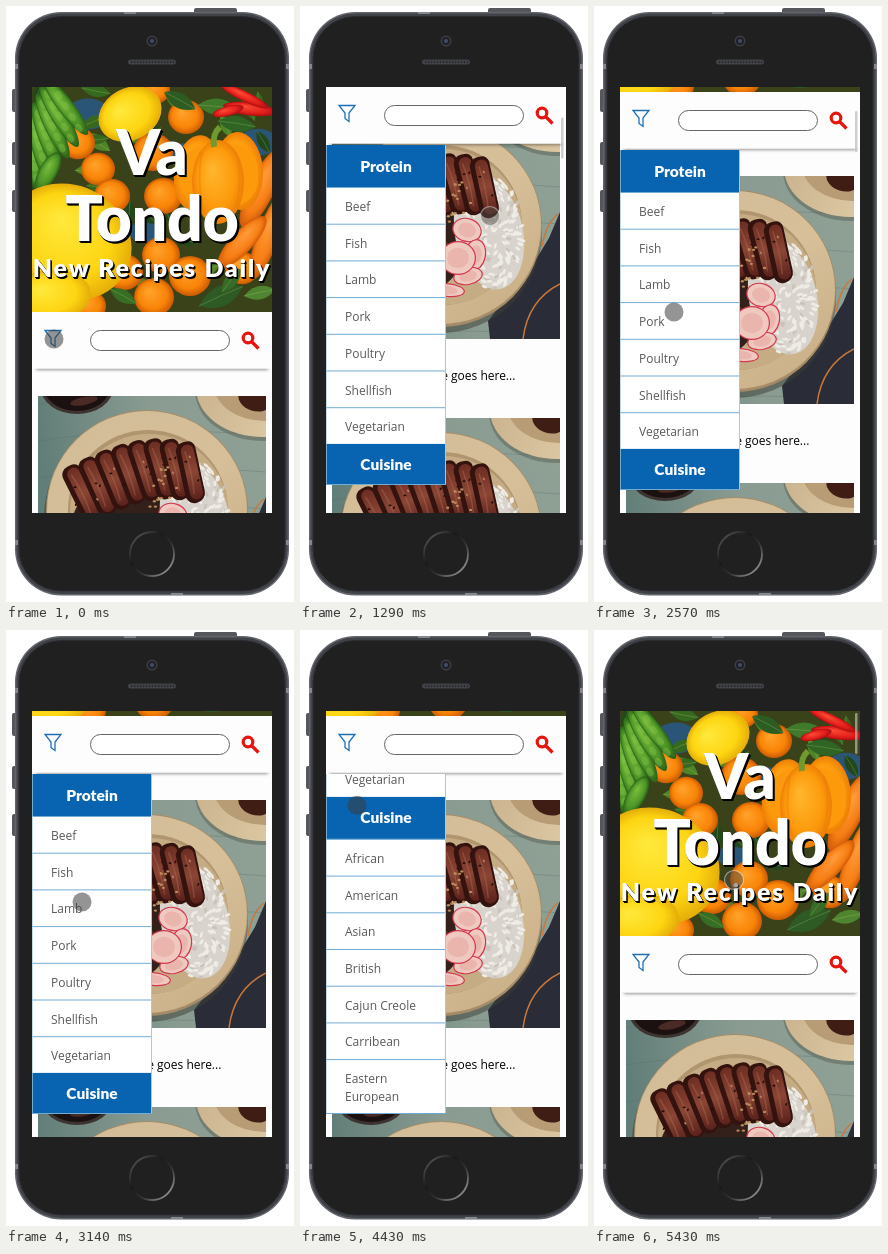
Write an HTML page with a canvas that moves like this. It is 288 px wide and 596 px high and loops after 5570 ms.

```html
<!DOCTYPE html>
<html lang="en">
<head>
<meta charset="utf-8">
<title>Recipe app demo</title>
<style>
html, body { margin: 0; width: 100%; height: 100%; overflow: hidden; background: #fff; }
canvas { display: block; width: 288px; height: 596px; }
</style>
</head>
<body>
<canvas id="stage"></canvas>
<script>
const W = 288, H = 596, LOOP = 5570, STEP = 1000 / 7, FRAMES = 39;
const SCREEN = { x: 26, y: 81, w: 240, h: 426 };
const HEAD = 'Lato, "Open Sans", sans-serif', BODY = '"Open Sans", "Noto Sans", sans-serif';
const BLUE = '#0864b1';

const canvas = document.getElementById('stage');
const dpr = Math.max(1, window.devicePixelRatio || 1);
canvas.width = W * dpr;
canvas.height = H * dpr;
const c = canvas.getContext('2d');

const rand = i => { const v = Math.sin(i * 12.9898) * 43758.5453; return v - Math.floor(v); };

// Each key is [step, value, value, ...]; values between keys are linear.
function track(keys, k) {
  let i = 0;
  while (i < keys.length - 2 && k >= keys[i + 1][0]) i++;
  const a = keys[i], b = keys[i + 1];
  const p = Math.min(1, Math.max(0, (k - a[0]) / (b[0] - a[0])));
  return a.slice(1).map((v, n) => v + (b[n + 1] - v) * p);
}

const pointer = [
  [0, 48, 333], [1, 48, 333], [3, 140, 440], [4, 190, 488], [6, 196, 398],
  [8, 194, 253], [9, 190, 210], [12, 95, 165], [14, 88, 198], [18, 80, 306],
  [20, 78, 304], [22, 76, 272], [24, 77, 430], [26, 77, 310], [27, 77, 304],
  [29, 77, 300], [32, 47, 113], [33, 47, 113], [35, 97, 160], [36, 112, 178], [38, 140, 250]
];
const pageKeys = [[0, 0], [4, 0], [6, 90], [8, 235], [9, 285], [11, 328], [14, 328], [18, 220], [35, 220], [36, 180], [37, 80], [38, 0]];
const menuKeys = [[0, 0], [23, 0], [24, 30], [26, 230], [27, 276], [38, 276]];

function rect(x, y, w, h, color) {
  c.fillStyle = color;
  c.fillRect(x, y, w, h);
}

function round(x, y, w, h, r, fill, stroke, line = 1) {
  c.beginPath();
  c.roundRect(x, y, w, h, r);
  if (fill) { c.fillStyle = fill; c.fill(); }
  if (stroke) { c.strokeStyle = stroke; c.lineWidth = line; c.stroke(); }
}

function oval(x, y, rx, ry, fill, turn = 0) {
  c.beginPath();
  c.ellipse(x, y, rx, ry, turn, 0, 7);
  c.fillStyle = fill;
  c.fill();
}

function shape(points, fill, stroke, line = 1) {
  c.beginPath();
  points.forEach(([x, y]) => c.lineTo(x, y));
  c.closePath();
  if (fill) { c.fillStyle = fill; c.fill(); }
  if (stroke) { c.strokeStyle = stroke; c.lineWidth = line; c.stroke(); }
}

function curve(x0, y0, cx, cy, x1, y1, color, line) {
  c.beginPath();
  c.moveTo(x0, y0);
  c.quadraticCurveTo(cx, cy, x1, y1);
  c.strokeStyle = color;
  c.lineWidth = line;
  c.stroke();
}

function blend(x0, y0, x1, y1, ...colors) {
  const g = c.createLinearGradient(x0, y0, x1, y1);
  colors.forEach((color, i) => g.addColorStop(i / (colors.length - 1), color));
  return g;
}

function write(str, x, y, font, color, align = 'left') {
  c.font = font;
  c.fillStyle = color;
  c.textAlign = align;
  c.fillText(str, x, y);
}

function clipped(x, y, w, h, draw) {
  c.save();
  c.beginPath();
  c.rect(x, y, w, h);
  c.clip();
  draw();
  c.restore();
}

// Shaded fruit: light upper left, darker rim.
function fruit(x, y, rx, ry, [light, mid, dark], turn = 0) {
  c.save();
  c.translate(x, y);
  c.rotate(turn);
  c.scale(rx, ry);
  const g = c.createRadialGradient(-.25, -.3, .05, 0, 0, 1);
  g.addColorStop(0, light);
  g.addColorStop(.7, mid);
  g.addColorStop(1, dark);
  oval(0, 0, 1, 1, g);
  c.restore();
}

function leaf(x, y, len, turn, color) {
  c.save();
  c.translate(x, y);
  c.rotate(turn);
  c.beginPath();
  c.moveTo(0, 0);
  c.quadraticCurveTo(len * .5, -len * .42, len, 0);
  c.quadraticCurveTo(len * .5, len * .42, 0, 0);
  c.fillStyle = color;
  c.fill();
  c.globalAlpha = .3;
  curve(0, 0, len / 2, -1, len, 0, '#b7d46a', .8);
  c.restore();
}

const ORANGE = ['#ffa22a', '#f98407', '#c95a04'];
const PEPPER = ['#ffb52c', '#fd9a0c', '#ee7f06'];
const LEMON = ['#ffe83a', '#fdd512', '#e5ad08'];
const CARROT = ['#ff9a38', '#f67d14', '#cf5a08'];
const GREEN = ['#79bb3c', '#4c9426', '#2a6018'];
const RED = ['#fb4a34', '#e01d1a', '#a80e10'];

function hero() {
  rect(26, 81, 240, 225, '#3a4219');
  [[82, 108, 22], [176, 148, 15], [252, 136, 19], [138, 226, 15]].forEach(([x, y, r]) => oval(x, y, r, r * .7, '#2b5577'));
  for (let i = 0; i < 34; i++)
    leaf(30 + rand(i + 3) * 225, 84 + rand(i + 41) * 215, 18 + rand(i + 9) * 16, rand(i + 70) * 6.3, ['#21471b', '#35691f', '#4f8428'][i % 3]);
  [[150, 84, 14], [180, 111, 18], [72, 137, 17], [92, 163, 17], [147, 146, 20], [106, 190, 18], [157, 190, 19],
   [118, 266, 19], [155, 249, 19], [184, 270, 21], [148, 291, 20], [236, 262, 17], [84, 300, 16]]
    .forEach(([x, y, r]) => fruit(x, y, r, r * .95, ORANGE));

  // Pods in the corner, each with a row of bumps.
  for (let i = 0; i < 6; i++) {
    const x = 27 + i * 6.5, y = 150 - i * 10, turn = -.15 - i * .1;
    fruit(x, y, 8, 36, GREEN, turn);
    for (let j = -2; j <= 2; j++)
      oval(x - Math.sin(turn) * j * 11, y + j * 11, 3.2, 4.6, '#86c44966', turn);
  }
  fruit(42, 166, 9, 22, GREEN, .5);

  fruit(124, 108, 33, 26, LEMON, -.5);
  leaf(158, 86, 36, .5, '#2d5c22');
  leaf(192, 99, 40, .1, '#3f7a2b');
  fruit(244, 103, 27, 6.5, RED, .12);
  fruit(238, 90, 27, 5, RED, .45);
  fruit(222, 105, 16, 5, RED, -.25);
  leaf(212, 115, 38, .15, '#2f6424');

  fruit(256, 182, 13, 44, CARROT, .45);
  fruit(262, 230, 11, 46, CARROT, .35);
  fruit(236, 236, 11, 34, CARROT, .75);
  fruit(191, 167, 23, 38, PEPPER, .13);
  fruit(233, 165, 24, 39, PEPPER, -.06);
  round(176, 138, 76, 62, 26, '#fd9a0c');
  fruit(212, 176, 26, 42, PEPPER);
  curve(196, 146, 190, 176, 198, 206, '#ea800770', 2);
  curve(230, 146, 238, 176, 228, 206, '#ea800770', 2);
  curve(208, 141, 206, 128, 214, 121, '#6f9a2e', 6);

  fruit(62, 236, 65, 57, LEMON, .45);
  fruit(45, 290, 40, 26, LEMON, -.1);
  leaf(193, 300, 48, -.42, '#2d5a25');
  leaf(238, 290, 32, -.2, '#4f8530');
  leaf(216, 286, 30, -.9, '#386b27');
  leaf(104, 283, 30, .5, '#376d25');

  const title = (str, x, y, size, off, gap) => {
    c.letterSpacing = gap + 'px';
    const font = `900 ${size}px ${HEAD}`;
    for (let d = off; d > 0; d -= .5) write(str, x + d, y + d, font, '#000', 'center');
    write(str, x, y, font, '#fff', 'center');
    c.letterSpacing = '0px';
  };
  title('Va', 146, 169, 62, 2, 0);
  title('Tondo', 146, 235, 62, 2, 0);
  title('New Recipes Daily', 146, 271, 25, 1.5, 1.7);
}

function radish(x, y, rx, ry, turn) {
  oval(x, y, rx, ry, '#d0364c', turn);
  oval(x, y, rx - 1.2, ry - 1.2, '#efc9c0', turn);
  oval(x, y, rx * .6, ry * .6, '#e3a39b88', turn);
}

// One recipe picture, 228 square.
function dish() {
  rect(0, 0, 228, 228, blend(0, 30, 228, 0, '#627e78', '#8a9c92', '#8fa095'));
  for (let i = 0; i < 7; i++) curve(0, i * 37 + 8, 100, i * 37 - 8, 228, i * 37 + 2, '#4f6a654d', 1);

  oval(39, -8, 36, 26, '#3d3330');
  oval(39, -9, 33, 24, '#1a1110');
  oval(46, 5, 14, 4, '#4a2a24', -.2);
  oval(225, -5, 68, 50, '#5a605280');
  oval(225, -8, 67, 49, blend(160, 0, 228, 40, '#cbb48f', '#dcc7a3'));
  oval(227, -11, 51, 36, '#b79c76');
  oval(217, 3, 17, 12, '#3f1d15', .3);

  shape([[228, 101], [217, 127], [203, 150], [156, 210], [158, 228], [228, 228]], '#2a2c38');
  curve(226, 103, 214, 112, 210, 136, '#c9783a', 1.5);
  curve(228, 173, 196, 189, 191, 228, '#c9783a', 1.5);
  curve(2, 162, 14, 187, 22, 228, '#a9b2af', 4);
  for (let i = 0; i < 4; i++) curve(1 + i * 5, 154 - i, 2 + i * 5, 171, 9 + i * 2, 183, '#b4bcba', 1.6);

  oval(108, 121, 102, 101, '#3c3f3680');
  oval(109, 115, 101, 101, '#a58b67');
  oval(109, 114, 100, 99, blend(40, 30, 180, 210, '#d3bd98', '#d6bf99', '#c9af87'));
  oval(110, 114, 80, 80, '#b0956f');
  oval(111, 116, 79, 78, '#c6ac85');

  oval(83, 134, 50, 48, '#33201a', .4);
  oval(157, 122, 34, 57, '#d8d4cd', -.2);
  for (let i = 0; i < 230; i++) {
    const a = rand(i + 5) * 6.3, r = Math.sqrt(rand(i + 300));
    oval(158 + Math.cos(a) * r * 33, 123 + Math.sin(a) * r * 57, 3, 1.4, i % 5 ? '#efece6' : '#c9c3ba', a * 2);
  }

  // Slices: dark crust with a paler cut face along the right side.
  for (let i = 0; i < 8; i++) {
    const x = 44 + i * 15.5, y = 98 - 25 * Math.sin(i / 7 * 2.1);
    c.save();
    c.translate(x, y);
    c.rotate(-.46 + i * .035);
    round(-10, -31, 20, 62, [9, 7, 10, 9], '#34130f');
    round(-5, -28, 13, 56, 7, blend(0, -28, 0, 28, '#6d2d22', '#8a4535', '#5a211b'));
    curve(-1, -22, 2, 0, -1, 22, '#b0705566', 1.5);
    c.restore();
    for (let j = 0; j < 3; j++)
      oval(x - 7 + rand(i * 4 + j) * 15, y - 17 + rand(i * 4 + j + 50) * 34, 1.5, .9, j % 2 ? '#b78360' : '#240c09', j);
  }
  for (let i = 0; i < 15; i++) oval(112 + rand(i + 21) * 27, 67 + rand(i + 83) * 47, 1.6, 1.2, '#b98a5c');
  for (let i = 0; i < 24; i++) {
    const x = 44 + rand(i + 8) * 66, y = 128 + rand(i + 62) * 48;
    fruit(x, y, 8, 5, i % 3 ? ['#76503a', '#4a2e1e', '#21140d'] : ['#5e8f38', '#2f5c20', '#16310f'], i);
  }
  [[67, 141], [82, 153], [92, 136], [75, 166]].forEach(([x, y]) => fruit(x, y, 9, 7, ['#9bd04a', '#559f2a', '#24541a'], x));
  radish(135, 119, 15, 12, .3);
  radish(143, 144, 11, 16, .2);
  radish(136, 165, 15, 9, -.2);
  radish(115, 179, 18, 7, .1);
  radish(126, 147, 18, 17, 0);
}

function card(y) {
  c.save();
  c.translate(32, y);
  clipped(0, 0, 228, 228, dish);
  c.restore();
  write('Recipe Name', 32, y + 245, `900 16px ${HEAD}`, '#000');
  write('Description of recipe goes here...', 32, y + 269, `12px ${BODY}`, '#000');
}

function bar(y) {
  c.save();
  c.shadowColor = 'rgba(0,0,0,.4)';
  c.shadowBlur = 3 * dpr;
  c.shadowOffsetY = dpr;
  rect(30, y + 40, 232, 16.5, '#fff');
  c.restore();
  rect(26, y, 240, 56.5, '#fdfdfd');
  shape([[39, y + 18.5], [55, y + 18.5], [49, y + 26], [49, y + 34.5], [45, y + 31.5], [45, y + 26]], null, '#1f6fb5', 1.3);
  round(84.5, y + 18.5, 139, 20, 10, '#fff', '#666');
  c.beginPath();
  c.arc(242, y + 26, 4.8, 0, 7);
  c.moveTo(246, y + 30);
  c.lineTo(252.5, y + 36.5);
  c.strokeStyle = '#e8130d';
  c.lineWidth = 3.2;
  c.stroke();
}

const MENU = [
  ['Protein', 'Beef', 'Fish', 'Lamb', 'Pork', 'Poultry', 'Shellfish', 'Vegetarian'],
  ['Cuisine', 'African', 'American', 'Asian', 'British', 'Cajun Creole', 'Carribean', 'Eastern European']
];
const ROW = 36.7, HEADER = 42, MENU_H = 340;

function menu(top, scroll, showBar) {
  clipped(26, top, 120, MENU_H, () => {
    rect(26, top, 120, MENU_H, '#fff');
    let y = top - scroll;
    MENU.forEach(([head, ...items]) => {
      rect(26, y, 119, HEADER, BLUE);
      write(head, 86, y + 26.5, `900 15.5px ${HEAD}`, '#fff', 'center');
      y += HEADER;
      items.forEach(item => {
        const lines = item === 'Eastern European' ? item.split(' ') : [item];
        rect(26, y, 119, 1, '#72acd5');
        lines.forEach((str, n) => write(str, 45, y + 24 + n * 18, `12px ${BODY}`, '#5a5a5a'));
        y += ROW + (lines.length - 1) * 18.3;
      });
    });
    rect(26, top, .7, MENU_H, '#a5c9e2');
    rect(145, top, 1, MENU_H, '#a5c9e2');
    rect(26, top + MENU_H - 1, 120, 1, '#72acd5');
    if (showBar) round(140, top + 3 + scroll * .544, 2, 184, 1, '#a9a9a9');
  });
}

function phone() {
  rect(0, 0, W, H, '#fff');
  round(188, 2, 43, 7, 2, '#55575d');
  [[83, 23], [136, 23], [184, 22]].forEach(([y, h]) => round(6, y, 6, h, 2, '#55575d'));
  round(9, 6, 274, 583.5, 46, '#63656b');
  round(10.5, 7.5, 271, 580.5, 44.5, '#404249');
  [9, 280].forEach(x => [58, 534].forEach(y => rect(x, y, 3, 5, '#85878c')));
  [[118, 6], [165, 587]].forEach(([x, y]) => rect(x, y, 12, 2, '#85878c'));
  round(13, 10.5, 266, 574.5, 42, '#1f201f', '#2c2d31');

  oval(146, 35, 5.5, 5.5, '#3d3e43');
  oval(146, 35, 4, 4, '#202126');
  oval(146, 35, 2, 2, '#444c6c');
  round(122, 53.5, 48, 5, 2.5, '#414247');
  for (let x = 125; x < 168; x += 3) rect(x, 55, 1.3, 2, '#28292c');

  c.beginPath();
  c.arc(146, 548, 22, 0, 7);
  c.strokeStyle = blend(130, 532, 162, 564, '#4a4b4c', '#161716', '#343535', '#88898a');
  c.lineWidth = 1.8;
  c.stroke();
}

function draw(k) {
  const [px, py] = track(pointer, k), [scroll] = track(pageKeys, k), [menuScroll] = track(menuKeys, k);
  const barTop = Math.max(SCREEN.y, 306 - scroll);
  const drag = (k >= 4 && k <= 9) || k >= 36;

  c.setTransform(dpr, 0, 0, dpr, 0, 0);
  phone();
  clipped(SCREEN.x, SCREEN.y, SCREEN.w, SCREEN.h, () => {
    rect(SCREEN.x, SCREEN.y, SCREEN.w, SCREEN.h, '#fdfdfd');
    c.save();
    c.translate(0, -scroll);
    clipped(26, 81, 240, 225, hero);
    c.restore();
    for (let i = 0; i < 3; i++) card(390 + i * 307 - scroll);
    bar(barTop);
    if (k >= 2 && k < 34) menu(barTop + 58, menuScroll, k >= 23 && k < 30);
    if ((k >= 5 && k <= 18) || k >= 36) round(261, 83 + scroll * .1, 2.5, 41, 1.2, 'rgba(185,185,185,.7)');
    oval(px, py, 9.5, 9.5, drag ? 'rgba(80,75,70,.5)' : 'rgba(60,60,60,.55)');
    if (drag) {
      c.strokeStyle = 'rgba(255,255,255,.45)';
      c.lineWidth = 1.2;
      c.stroke();
    }
  });
}

function tick(now) {
  const t = now % LOOP;
  draw(Math.min(FRAMES - 1, Math.floor((t + 5) / STEP)));
  requestAnimationFrame(tick);
}
tick(performance.now());
</script>
</body>
</html>
```
